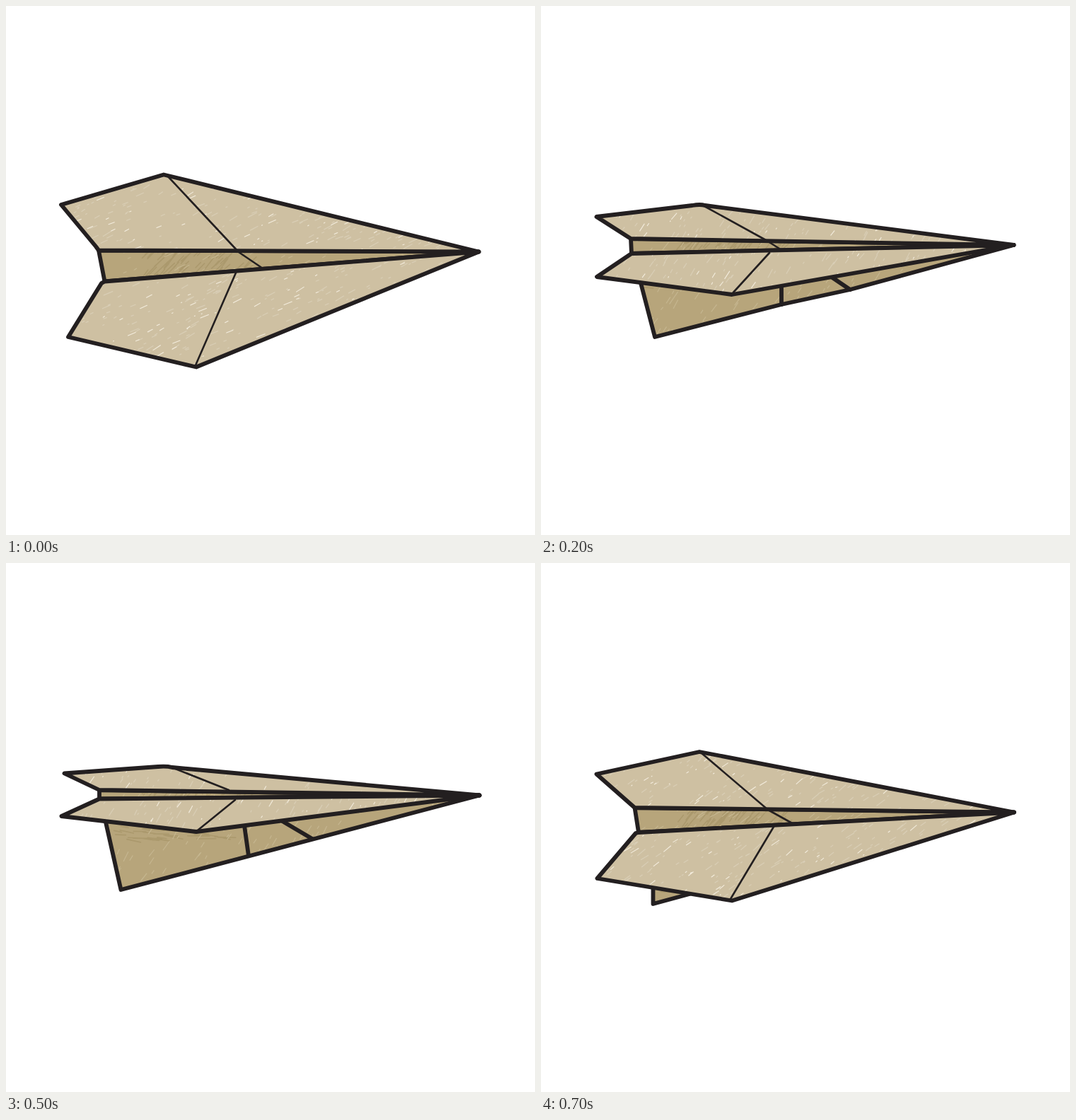
These frames come from a looping animation (748x748 px, 0.8 s). An HTML page:

```html
<!DOCTYPE html>
<html lang="en">
<head>
<meta charset="utf-8">
<title>Paper plane</title>
<style>
  html, body { margin: 0; width: 100%; height: 100%; overflow: hidden; background: #fff; }
  svg { display: block; width: 100%; height: 100%; }
  .pose { visibility: hidden; animation: 800ms step-end infinite; }
  .pose:nth-child(1) { animation-name: pose1; }
  .pose:nth-child(2) { animation-name: pose2; }
  .pose:nth-child(3) { animation-name: pose3; }
  .pose:nth-child(4) { animation-name: pose4; }
  .pose:nth-child(5) { animation-name: pose5; }
  @keyframes pose1 { 0% { visibility: visible } 12.5%, 100% { visibility: hidden } }
  @keyframes pose2 { 0%, 25% { visibility: hidden } 12.5%, 87.5%, 100% { visibility: visible } }
  @keyframes pose3 { 0%, 37.5%, 87.5%, 100% { visibility: hidden } 25%, 75% { visibility: visible } }
  @keyframes pose4 { 0%, 50%, 75%, 100% { visibility: hidden } 37.5%, 62.5% { visibility: visible } }
  @keyframes pose5 { 0%, 62.5%, 100% { visibility: hidden } 50% { visibility: visible } }
  path { fill: none; stroke-linecap: round; stroke-linejoin: round; }
  .wing { fill: #cec0a2; }
  .fold { fill: #b7a57b; }
  .ink { stroke: #231f20; stroke-width: 5.8; }
  .thin { stroke: #231f20; stroke-width: 2.6; }
  .pale { stroke: #d9ceb6; stroke-width: 1.2; }
  .white { stroke: #f3ecdd; stroke-width: 1.1; }
  .dark { stroke: #ab996d; stroke-width: 1.6; }
  .sand { stroke: #c6b791; stroke-width: 1.1; }
</style>
</head>
<body>
<svg viewBox="0 0 748 748"><g id="plane"></g></svg>
<script>
// creases are thin lines on the paper, seams are thick lines across the keel
const poses = [
  { angle: -27,
    far: 'M78 281L223 238.5L668.5 347.5L131 345.5L127 340Z',
    fold: 'M131 345.5L668.5 347.5L139.5 389.5Z',
    near: 'M139.5 389.5L135 392L88 468L269 510.5L668.5 347.5Z',
    creases: 'M229 241L329 348L363 371M326 375L268 508' },
  { angle: -36,
    far: 'M78.5 298.5L224 267L669 352.5L132.5 346Z',
    fold: 'M132.5 346L669 352.5L138 381Z',
    near: 'M138 381L134 382L79.5 446L270 477.5L669 352.5Z',
    keel: 'M158.5 450L158.5 482L210 468Z',
    creases: 'M226 268L321 349L357 369M329 373L268 475' },
  { angle: -56,
    far: 'M78.5 298L214 282Q225 280 232 282L668.5 338L127 329Z',
    fold: 'M127 329L668.5 338L128 350Z',
    near: 'M128 350L79 383L270 408L668.5 338Z',
    keel: 'M138 380L161 468L340 422L437 401L668.5 338Z',
    seams: 'M340 396V422M409 382L437 401',
    creases: 'M229 282L318 331L337 343M323 349L271 406' },
  { angle: -58,
    far: 'M82.5 297.5L215 288Q227 287 235 289L669.5 328.5L132 321Z',
    fold: 'M132 321L669.5 328.5L132 333.5Z',
    near: 'M132 333.5L78.5 358L269 380L669.5 328.5Z',
    keel: 'M140 362L162.5 462L669.5 328.5Z',
    seams: 'M337 371L343 414M389 364L433 390',
    creases: 'M237 290L315 321M324 335L271 378' },
  { angle: -60,
    far: 'M85 296L217 292Q229 291 237 293L669 322L135 315Z',
    fold: 'M135 315L669 322L135 321Z',
    near: 'M135 321L79 338L268 357L669 322Z',
    keel: 'M140 342L164 457L669 322Z',
    seams: 'M335 350L344 409M380 346L430 386',
    creases: 'M240 294L306 317M322 322L271 355' }
];

const NS = 'http://www.w3.org/2000/svg';
let seed = 7;
const rnd = () => (seed = (seed * 16807) % 2147483647) / 2147483647;
const between = (a, b) => a + (b - a) * rnd();

function add(parent, tag, attrs) {
  const el = document.createElementNS(NS, tag);
  for (const key in attrs) el.setAttribute(key, attrs[key]);
  return parent.appendChild(el);
}

function hatch(box, count, angle, min, max) {
  let d = '';
  for (let i = 0; i < count; i++) {
    const a = (angle + between(-7, 7)) * Math.PI / 180;
    const len = min + (max - min) * rnd() ** 2;
    const x = between(box.x, box.x + box.width);
    const y = between(box.y, box.y + box.height);
    d += `M${x.toFixed(1)} ${y.toFixed(1)}l${(len * Math.cos(a)).toFixed(1)} ${(len * Math.sin(a)).toFixed(1)}`;
  }
  return d;
}

function face(g, id, d, kind, angle) {
  const shape = add(g, 'path', { d, class: kind });
  const clip = add(g, 'clipPath', { id });
  add(clip, 'path', { d });
  const marks = add(g, 'g', { 'clip-path': `url(#${id})` });
  const box = shape.getBBox();
  const area = box.width * box.height;
  const layer = (cls, region, n, a, min, max) =>
    add(marks, 'path', { class: cls, d: hatch(region, n, a, min, max) });
  if (kind === 'wing') {
    layer('pale', box, area / 280, angle, 2, 14);
    layer('white', box, area / 800, angle, 1, 13);
  } else {
    const isKeel = id.startsWith('keel');
    const shade = isKeel
      ? { x: box.x + 8, y: box.y + box.height * .22, width: 160, height: box.height * .25 }
      : { x: box.x + 60, y: box.y, width: 155, height: box.height };
    layer('dark', shade, 60, isKeel ? 6 : -48, 10, 34);
    layer('sand', box, area / 330, angle, 4, 16);
  }
  add(g, 'path', { d, class: 'ink' });
}

const plane = document.getElementById('plane');
poses.forEach((p, i) => {
  const g = add(plane, 'g', { class: 'pose' });
  if (p.keel) face(g, 'keel' + i, p.keel, 'fold', p.angle);
  if (p.seams) add(g, 'path', { d: p.seams, class: 'ink' });
  face(g, 'fold' + i, p.fold, 'fold', p.angle);
  face(g, 'far' + i, p.far, 'wing', p.angle);
  face(g, 'near' + i, p.near, 'wing', p.angle);
  add(g, 'path', { d: p.creases, class: 'thin' });
});
</script>
</body>
</html>
```
